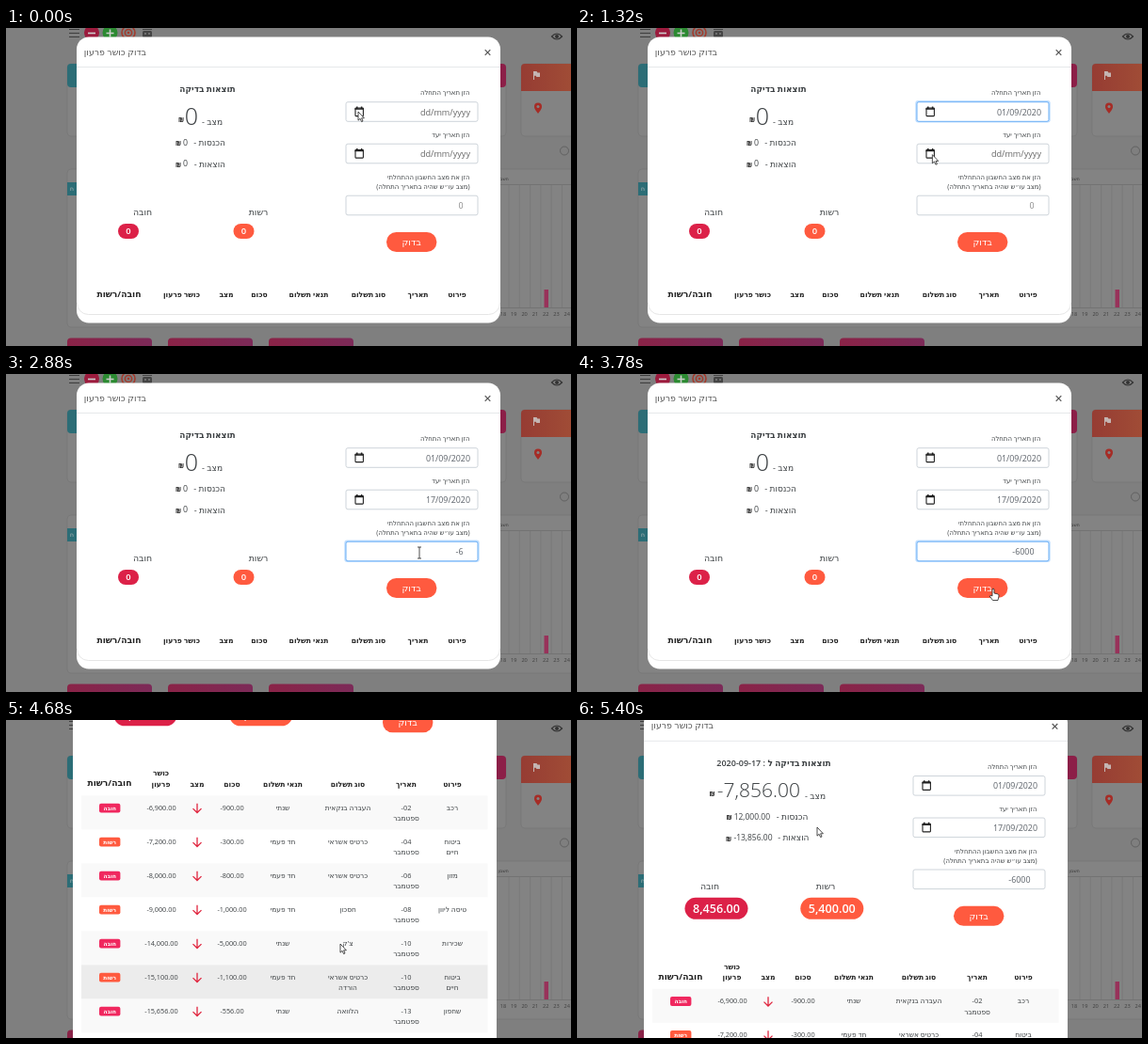
An HTML page for the animation above (7.4 s loop, 600 by 338 pixels).

```html
<!DOCTYPE html>
<html>
<head>
<meta charset="utf-8">
<style>
html, body { margin: 0; width: 100%; height: 100%; overflow: hidden; background: #808080; }
svg { display: block; width: 100vw; height: 100vh; }
text { font-family: "Open Sans", "Noto Sans", "DejaVu Sans", sans-serif; white-space: pre; }
.cal text { font-family: "Liberation Sans", Arial, sans-serif; }
</style>
</head>
<body>
<svg id="stage" viewBox="0 0 600 338" xmlns="http://www.w3.org/2000/svg"></svg>
<script>
const LOOP = 7400;
const ORANGE = '#ff5a3f', RED = '#dc2148', PINK = '#f0285f', INK = '#3c4043';

// Markup helpers; text is placed by its vertical centre.
const text = (x, y, s, size, o = {}) =>
  `<text x="${x}" y="${y + size * 0.34}" font-size="${size}" text-anchor="${o.a || 'middle'}" ` +
  `font-weight="${o.w || 400}" fill="${o.c || INK}">${s}</text>`;
const rect = (x, y, w, h, fill, r = 0, more = '') =>
  `<rect x="${x}" y="${y}" width="${w}" height="${h}" rx="${r}" fill="${fill}" ${more}/>`;
const line = (d, c, w = 1, more = '') =>
  `<path d="${d}" fill="none" stroke="${c}" stroke-width="${w}" ${more}/>`;
const circle = (x, y, r, fill, more = '') =>
  `<circle cx="${x}" cy="${y}" r="${r}" fill="${fill}" ${more}/>`;
const group = (id, body, more = '') => `<g id="${id}" ${more}>${body}</g>`;
const range = n => [...Array(n).keys()];

function page() {
  const grid = range(7).map(i => {
    const x = 528 + i * 11.3;
    return line(`M${x + 6} 166V297`, '#747474', 0.6) + text(x, 304, 18 + i, 5.6, { c: '#3e3e3e' });
  }).join('');
  const card = '#838383', edge = 'stroke="#747474" stroke-width=".6"';
  return rect(0, 0, 600, 338, '#7f7f7f') +
    line('M67 1.5H78M67 5.5H78M67 9.5H78', '#3d3d3d', 1) +
    circle(91, 5, 8, '#9c1b3d') + line('M87 5.5H95', '#ccc', 1.6) +
    circle(110.5, 5, 8, '#2b8a31') + line('M106.5 5.5H114.5M110.5 1.5V9.5', '#ccc', 1.6) +
    circle(130, 5, 7, 'none', 'stroke="#a33a2c" stroke-width="1.6"') +
    circle(130, 5, 3.6, 'none', 'stroke="#a33a2c" stroke-width="1.5"') + circle(130, 5, 1.3, '#a33a2c') +
    rect(145, 3, 10, 7, '#444', 1.5) + line('M145 1.5H155', '#444', 1) +
    line('M147 6H149M151 6H153', '#999', 1.2) +
    line('M579.5 9Q585 3 590.5 9Q585 15 579.5 9Z', '#333', 1.2) + circle(585, 9, 2, '#333') +
    rect(65, 38, 60, 77, card, 4, edge) + rect(65, 38, 60, 25, '#2c6d76', 4) +
    rect(450, 38, 81, 77, card, 4, edge) + rect(450, 38, 81, 25, '#8c1f48', 4) +
    rect(547, 38, 70, 77, card, 4, edge) +
    '<path d="M547 67V42a4 4 0 0 1 4-4H600V67Z" fill="url(#warm)"/>' +
    '<path d="M560 46H563.5L564.5 47.5H567V52H563.5L562.5 50.8H561V55H560Z" fill="#c4b5b2"/>' +
    '<path d="M565 91C562 87 561 85.500 561 83.500a4 4 0 0 1 8 0C569 85.500 568 87 565 91Z" fill="#a62c26"/>' +
    circle(565, 83.500, 1.5, card) +
    circle(593, 130.5, 4.5, 'none', 'stroke="#555" stroke-width=".7"') +
    rect(65, 150, 560, 168, card, 4, edge) + rect(65, 164, 20, 14, '#2c6d76') +
    text(70, 171, 'ח', 6, { c: '#bbb' }) +
    text(528, 160, 'חשבון', 4.5, { c: '#333' }) +
    line('M515 166.500H600M515 297.500H600', '#6d6d6d', 0.7) + grid +
    rect(571.500, 278, 4.5, 19, '#98325a') +
    [65, 172, 279].map(x => rect(x, 329.500, 90, 20, 'url(#rose)', 4)).join('');
}

const FIELDS = [89, 133.5, 188.5];
function field(i) {
  const y = FIELDS[i];
  const icon = i < 2 ? rect(371, y - 4, 8.4, 8.6, 'none', 0.6, 'stroke="#222" stroke-width="1.1"') +
    line(`M370.500 ${y - 3}H380M372.800 ${y - 5.5}V${y - 3}M377.600 ${y - 5.5}V${y - 3}`, '#222', 1.5) : '';
  return group('ring' + i, rect(359.3, y - 12, 143.4, 23.4, '#bfdeff', 3)) +
    rect(361, y - 10.3, 140, 20.6, '#fff', 2, `id="box${i}" stroke="#ced4da" stroke-width="1"`) + icon;
}

function form() {
  const label = (y, s) => text(492.5, y, s, 6.9, { a: 'end' });
  const empty = i => group('empty' + i, rect(439.8, FIELDS[i] - 6.6, 11.6, 13, '#2878d8', 0, `id="mark${i}"`) +
    `<text x="493" y="${FIELDS[i] + 3.5}" font-size="9.100" text-anchor="end" fill="#666"><tspan id="day${i}">dd</tspan>/mm/yyyy</text>`);
  const full = (i, s) => group('full' + i, text(493, FIELDS[i] + 0.6, s, 8.9, { a: 'end', c: '#5a6068' }));
  return label(69, 'הזן תאריך התחלה') + label(114, 'הזן תאריך יעד') +
    label(159, 'הזן את מצב החשבון ההתחלתי') + label(169, '(מצב עו״ש שהיה בתאריך התחלה)') +
    range(3).map(field).join('') + empty(0) + empty(1) + full(0, '01/09/2020') + full(1, '17/09/2020') +
    group('amount', text(485.5, 189, '', 8.9, { a: 'end', c: '#5a6068' })) +
    line('M486.300 182.500V195', '#222', 0.8, 'id="caret"') +
    rect(404, 217, 53.4, 21, ORANGE, 10.5) + text(430.6, 227.5, 'בדוק', 9.6, { c: '#fff' });
}

const pill = (x, y, w, h, fill, s, size) =>
  rect(x, y, w, h, fill, h / 2) + text(x + w / 2, y + h / 2 + 0.3, s, size, { c: '#fff', w: 600 });
const shekel = (x, y) => text(x, y, '₪', 6.6, { w: 700, c: '#222' });
const head = (x, y, s, size = 7.6) => text(x, y, s, size, { w: 700, c: '#222' });

function before() {
  const heads = [[479, 'פירוט'], [437.5, 'תאריך'], [385, 'סוג תשלום'], [321.5, 'תנאי תשלום'],
    [269, 'סכום'], [234, 'מצב'], [186.5, 'כושר פרעון']];
  return text(214, 65, 'תוצאות בדיקה', 9, { w: 600 }) +
    shekel(186, 98) + text(197, 94, '0', 25, { w: 300 }) + text(230, 100, '- מצב', 9, { a: 'end' }) +
    [[122, 'הכנסות'], [144.5, 'הוצאות']].map(([y, s]) => shekel(183, y + 1) + text(190.5, y, '0', 8.8) +
      text(233, y, '- ' + s, 9, { a: 'end' })).join('') +
    pill(119, 208, 22, 16, RED, '0', 9.4) + pill(241.5, 208, 22, 16, ORANGE, '0', 9.4) +
    heads.map(([x, s]) => head(x, 283, s)).join('') + head(120, 282.5, 'חובה/רשות', 9.2) +
    line('M75.500 292a12 12 0 0 0 12 12.500H512.500a12 12 0 0 0 12 -12.500', '#e0e0e0', 0.8);
}

const TOP = 305, ROW = 36;
const rows = [
  ['רכב', '02', 'העברה בנקאית', 'שנתי', '900', '6,900', 1],
  ['ביטוח|חיים', '04', 'כרטיס אשראי', 'חד פעמי', '300', '7,200', 0],
  ['מזון', '06', 'כרטיס אשראי', 'חד פעמי', '800', '8,000', 1],
  ['טיסה ליוון', '08', 'חסכון', 'חד פעמי', '1,000', '9,000', 0],
  ['שכירות', '10', "צ'ק", 'שנתי', '5,000', '14,000', 1],
  ['ביטוח|חיים', '10', 'כרטיס אשראי|הורדה', 'חד פעמי', '1,100', '15,100', 0],
  ['שחפון', '13', 'הלוואה', 'שנתי', '556', '15,656', 1],
  ['ארנונה', '14', 'העברה בנקאית', 'שנתי', '700', '16,356', 1]
];

function after() {
  const cell = (x, y, s) => s.split('|').map((part, i) => text(x, y + i * 11.5, part, 7.4)).join('');
  const body = rows.map(([name, day, kind, terms, sum, left, must], i) => {
    const y = TOP + ROW * i + 13;
    return cell(478, y, name) + cell(429, y, `-${day}|ספטמבר`) + cell(367, y, kind) + cell(298, y, terms) +
      text(244, y, `-${sum}.00`, 7.3) + text(169, y, `-${left}.00`, 7.3) +
      line(`M207 ${y - 4.5}V${y + 5}M202.500 ${y + 0.8}L207 ${y + 5.2}L211.500 ${y + 0.8}`, '#e0263f', 1.3) +
      rect(103, y - 4.7, 22.4, 9.8, must ? PINK : ORANGE, 2) +
      text(114.2, y + 0.3, must ? 'חובה' : 'רשות', 5.8, { w: 700, c: '#fff' });
  }).join('');
  const stripes = [0, 2, 4, 6, 8].map(i => rect(84, TOP + ROW * i, 431.500, ROW, '#f9f9f9')).join('');
  const heads = [[478, 'פירוט'], [429, 'תאריך'], [367, 'סוג תשלום'], [298, 'תנאי תשלום'], [244, 'סכום'], [207, 'מצב']];
  return text(213, 65.5, '2020-09-17 : תוצאות בדיקה ל', 9, { w: 600 }) +
    shekel(147.500, 98) + text(241, 94.5, '-7,856.00', 21, { w: 300, a: 'end' }) + text(268, 100, '- מצב', 9, { a: 'end' }) +
    shekel(165.5, 123) + text(209, 122, '12,000.00', 8.5, { a: 'end' }) + text(249.500, 122, '- הכנסות', 9, { a: 'end' }) +
    shekel(165, 145.5) + text(211.5, 144.500, '-13,856.00', 8.5, { a: 'end' }) + text(250.5, 144.500, '- הוצאות', 9, { a: 'end' }) +
    pill(118.5, 208, 67, 23, RED, '8,456.00', 12.6) + pill(241.3, 208, 67, 23, ORANGE, '5,400.00', 12.6) +
    heads.map(([x, s]) => head(x, 293, s)).join('') + head(168.500, 281.500, 'כושר') + head(168.500, 293, 'פרעון') +
    head(114, 292, 'חובה/רשות', 9.2) +
    stripes + rect(84, 0, 431.500, ROW, '#ececec', 0, 'id="hover"') + body;
}

const colX = c => 487 - c * 15.8, rowY = r => 150 + r * 15.75;
function calendar() {
  const days = range(42).map(k => {
    const n = k < 2 ? 30 + k : k > 31 ? k - 31 : k - 1;
    return text(colX(k % 7), rowY(k / 7 | 0), n, 7.2, { c: k < 2 || k > 31 ? '#8a8a8a' : '#222' });
  }).join('');
  return rect(378.500, 100.500, 123.500, 159.500, '#000', 1, 'opacity=".28" filter="url(#soft)"') +
    rect(378.500, 100, 122.500, 158.500, '#fff', 0, 'stroke="#b4b4b4" stroke-width=".8"') +
    text(494.5, 113, '2020 ספטמבר', 7, { a: 'end', w: 700, c: '#111' }) +
    '<path d="M447.600 111.600H451.800L449.700 114.600Z" fill="#222"/>' +
    line('M392 118V109M388 113L392 109L396 113M410 109V118M406 114L410 118L414 114', '#444', 1) +
    [...'אבגדהוש'].map((s, c) => text(colX(c), 133.500, s, 6.8, { c: '#333' })).join('') +
    days + rect(432, 158, 15, 15.4, 'none', 0, 'stroke="#999" stroke-width=".9"') +
    text(481, 246, 'היום', 7, { c: '#2a80e0' }) +
    group('pick', rect(-7.3, -7.3, 14.6, 14.6, '#0a7cf0', 0, 'stroke="#111" stroke-width="1.300"') +
      text(0, 0, '', 7.2, { c: '#fff', w: 700 }));
}

const pointers =
  group('arrow', '<path d="M0 0V9.200L2.100 7.300L3.600 10.600L5 10L3.600 6.800H6.400Z" fill="#fff" stroke="#222" stroke-width=".8"/>') +
  group('beam', line('M-2 -6H2M0 -6V6M-2 6H2', '#222', 0.8)) +
  group('hand', '<path d="M-1 .8Q0 -.6 1 .8V5L5.200 6Q6.200 6.500 6 8L5 12.500H-.5L-3.800 8Q-3.500 6.500 -1 8Z" fill="#fff" stroke="#222" stroke-width=".8"/>');

const gradient = (id, a, b) =>
  `<linearGradient id="${id}"><stop stop-color="${a}"/><stop offset="1" stop-color="${b}"/></linearGradient>`;

document.getElementById('stage').innerHTML =
  '<defs><filter id="soft" x="-10%" y="-10%" width="120%" height="120%"><feGaussianBlur stdDeviation="1.800"/></filter>' +
  gradient('warm', '#963c33', '#a04c36') + gradient('rose', '#8a2347', '#7c2a58') + '</defs>' +
  page() +
  group('modal',
    rect(75, 9.5, 450, 304, '#fff', 13, 'id="sheet"') +
    text(149, 25.5, 'בדוק כושר פרעון', 9.4, { a: 'end', c: '#555' }) +
    line('M508.700 23.200L514.300 28.800M514.300 23.200L508.700 28.800', '#555', 1.2) +
    line('M75 41.500H525', '#e6e8ea', 1) +
    text(145, 196, 'חובה', 9.4) + text(268, 196, 'רשות', 9.4) +
    form() + group('before', before()) + group('after', after())) +
  group('calendar', calendar(), 'class="cal"') + group('pointer', pointers);

const $ = Object.fromEntries([...document.querySelectorAll('[id]')].map(e => [e.id, e]));
const amountText = $.amount.firstChild, pickText = $.pick.lastChild;
const show = (el, on) => el.setAttribute('visibility', on ? 'visible' : 'hidden');
const move = (el, x, y) => el.setAttribute('transform', `translate(${x} ${y})`);

// Key rows: [time, ...values]
const PATH = [[0, 374, 89], [130, 374, 89], [690, 455, 149], [900, 455, 149], [1380, 374, 134], [1500, 374, 134],
  [1950, 425, 228], [2070, 425, 228], [2250, 441, 190], [2400, 439, 190], [3000, 439, 190], [3540, 442, 228],
  [3870, 442, 228], [4140, 344, 126], [4350, 355, 238], [4740, 355, 238], [5310, 255, 114], [LOOP, 255, 114]];
const SCROLL = [[0, 0], [3900, 0], [4140, 125], [4350, 265], [4500, 265], [4680, 225], [5220, 44], [5400, 19.2], [LOOP, 19.2]];
const CLICK = { open1: 90, pick1: 870, open2: 1440, pick2: 2040, focus: 2220, result: 3840 };
const KEYS = [2640, 2790, 2940, 3060, 3180];

function at(keys, t, ease = u => u) {
  const i = Math.max(1, keys.findIndex(k => k[0] >= t));
  const a = keys[i - 1], b = keys[i];
  const u = ease((t - a[0]) / (b[0] - a[0]));
  return a.slice(1).map((v, j) => v + (b[j + 1] - v) * u);
}
const smooth = u => u * u * (3 - 2 * u);
const within = (t, a, b) => t >= a && t < b;

function draw(t) {
  const [x, y] = at(PATH, t, smooth);
  const [scroll] = at(SCROLL, t);
  const done = t >= CLICK.result;

  move($.modal, done ? -4 : 0, -scroll);
  $.sheet.setAttribute('height', done ? 700 : 304);
  show($.before, !done);
  show($.after, done);

  const open = [within(t, CLICK.open1, CLICK.pick1), within(t, CLICK.open2, CLICK.pick2)];
  const focus = [within(t, CLICK.open1, CLICK.open2), within(t, CLICK.open2, CLICK.focus), within(t, CLICK.focus, CLICK.result)];
  const filled = [t >= CLICK.pick1, t >= CLICK.pick2];
  focus.forEach((on, i) => {
    show($['ring' + i], on);
    $['box' + i].setAttribute('stroke', on ? '#6fb1f5' : '#ced4da');
  });
  open.forEach((on, i) => {
    show($['empty' + i], !filled[i]);
    show($['full' + i], filled[i]);
    show($['mark' + i], on);
    $['day' + i].setAttribute('fill', on ? '#fff' : '#666');
  });

  const typed = KEYS.filter(k => t >= k).length;
  amountText.textContent = typed ? '-6000'.slice(0, typed) : '0';
  amountText.setAttribute('fill', typed ? '#5a6068' : '#888');
  show($.caret, within(t, CLICK.focus, 3570) && (t - CLICK.focus) % 1000 < 500);

  // Calendar, with the day under the pointer marked
  const drop = open[1] ? 44.7 : 0;
  show($.calendar, open[0] || open[1]);
  move($.calendar, 0, drop);
  const c = Math.round((487 - x) / 15.8), r = Math.round((y - drop - 150) / 15.75);
  const over = (open[0] || open[1]) && c >= 0 && c < 7 && r >= 0 && r < 6;
  show($.pick, over);
  if (over) {
    const k = r * 7 + c;
    move($.pick, colX(c), rowY(r));
    pickText.textContent = k < 2 ? 30 + k : k > 31 ? k - 31 : k - 1;
  }

  // The row highlight lags behind the scrolling
  const late = Math.floor((t - 4500) / 200) * 200 + 4500;
  const row = Math.floor((at(PATH, late < 0 ? 0 : late, smooth)[1] + at(SCROLL, late < 0 ? 0 : late)[0] - TOP) / ROW);
  show($.hover, done && late > 4000 && row >= 0);
  $.hover.setAttribute('y', TOP + ROW * row);

  const hand = within(t, 3000, 3900) && y > 217;
  const beam = within(t, 2200, 3300) && y > 178 && y < 199;
  move($.pointer, x, y);
  show($.hand, hand);
  show($.beam, beam);
  show($.arrow, !hand && !beam);
}

const start = performance.now();
function tick() {
  draw((performance.now() - start) % LOOP);
  requestAnimationFrame(tick);
}
draw(0);
tick();
</script>
</body>
</html>
```
